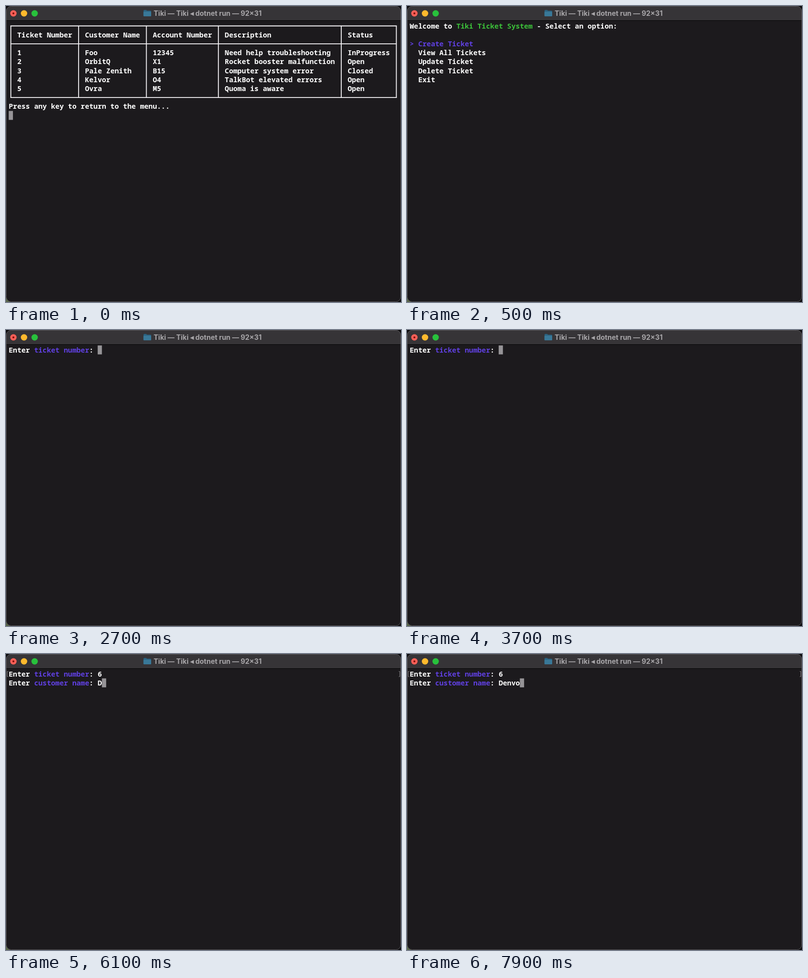
Recreate the animation shown at these times as an HTML page. Size 800 px wide and 602 px high, loop 8 s.

```html
<!DOCTYPE html>
<html lang="en">
<head>
<meta charset="utf-8">
<title>Ticket terminal</title>
<style>
  html, body { margin: 0; width: 100%; height: 100%; overflow: hidden; background: #0c0b0d; }
  svg { display: block; width: 800px; height: 602px; }
  text { white-space: pre; }
  #screen { font: 600 14.3px "Noto Sans Mono", "DejaVu Sans Mono", monospace; }
  #title { font: 700 14px Inter, Roboto, sans-serif; fill: #a8a6a9; }
</style>
</head>
<body>
<svg viewBox="0 0 800 602">
  <path d="M0 592V602H10Z" fill="#59664a"/>
  <rect x=".5" y=".5" width="799" height="601" rx="10" fill="#1c1a1d"/>
  <path d="M.5 29V10.5a10 10 0 0 1 10-10H789.5a10 10 0 0 1 10 10V29Z" fill="#363437"/>
  <path d="M1 29.5H799" stroke="#070608"/>
  <rect x=".5" y=".5" width="799" height="601" rx="10" fill="none" stroke="#5b595c"/>
  <circle cx="15" cy="15" r="6.5" fill="#fe5f57"/>
  <circle cx="15" cy="15" r="2" fill="#7d0d08"/>
  <circle cx="36.5" cy="15" r="6.5" fill="#feb92d"/>
  <circle cx="58" cy="15" r="6.5" fill="#28c13c"/>
  <path d="M278.5 9.5q0-1.5 1.5-1.5h4l1.5 1.5h7q1.5 0 1.5 1.500V19.500q0 1.500-1.500 1.500H280q-1.500 0-1.500-1.500Z" fill="#2b617f"/>
  <rect x="278.500" y="11.500" width="15.500" height="9.500" rx="1.200" fill="#397898"/>
  <text id="title" x="299" y="19.500">Tiki — Tiki ◂ dotnet run — 92×31</text>
  <g id="screen"></g>
</svg>
<script>
const CELL = 8.58, LINE = 18.2, LEFT = 5.5, TOP = 31.4;
const WHITE = "#fff", PURPLE = "#6040e2", GREEN = "#3cc23a", GRAY = "#969497";
const screen = document.getElementById("screen");

const px = col => LEFT + col * CELL;
const py = row => TOP + row * LINE;

const text = (col, row, str, fill = WHITE) =>
  `<text x="${px(col)}" y="${py(row) + 14.2}" fill="${fill}">${str.replace(">", "&gt;")}</text>`;

const cursor = (col, row) =>
  `<rect x="${px(col)}" y="${py(row)}" width="${CELL}" height="${LINE}" fill="${GRAY}"/>`;

function table() {
  const cols = [2, 18, 34, 51, 80];
  const rows = [
    ["Ticket Number", "Customer Name", "Account Number", "Description", "Status"],
    ["1", "Foo", "12345", "Need help troubleshooting", "InProgress"],
    ["2", "OrbitQ", "X1", "Rocket booster malfunction", "Open"],
    ["3", "Pale Zenith", "B15", "Computer system error", "Closed"],
    ["4", "Kelvor", "O4", "TalkBot elevated errors", "Open"],
    ["5", "Ovra", "M5", "Quoma is aware", "Open"]
  ];
  const mid = row => py(row + .5);
  const across = [0, 2, 8].map(r => `M${px(.5) - 1} ${mid(r)}H${px(91.5) + 1}`);
  const down = [.5, 16.5, 32.5, 49.5, 78.5, 91.5].map(c => `M${px(c)} ${mid(0)}V${mid(8)}`);
  return `<path d="${across.join("")}${down.join("")}" stroke="#f4f2f5" stroke-width="1.8"/>` +
    rows.map((r, i) => r.map((s, j) => text(cols[j], i ? i + 2 : 1, s)).join("")).join("") +
    text(0, 9, "Press any key to return to the menu...");
}

function menu() {
  const items = ["View All Tickets", "Update Ticket", "Delete Ticket", "Exit"];
  return text(0, 0, "Welcome to") + text(11, 0, "Tiki Ticket System", GREEN) +
    text(30, 0, "- Select an option:") + text(0, 2, "> Create Ticket", PURPLE) +
    items.map((s, i) => text(2, i + 3, s)).join("");
}

const prompt = (row, label, value) =>
  text(0, row, "Enter") + text(6, row, label, PURPLE) + text(19, row, ": " + value);

const brackets = `<path d="M4.500 35.500H2.500V46H4.500M795.500 35.500H797.500V46H795.500" fill="none" stroke="#858386"/>`;

const NAME = "Denvo", KEYS = [6000, 6500, 7200, 7600, 7900];
const HIDDEN = [[100, 500], [3000, 3600], [5000, 5600]];

function frame(t) {
  const lit = !HIDDEN.some(([a, b]) => t >= a && t < b);
  const caret = (col, row) => lit ? cursor(col, row) : "";
  if (t < 500) return table() + caret(0, 10);
  if (t < 2100) return menu();
  const number = t < 3800 ? "" : "6";
  const first = prompt(0, "ticket number", number);
  if (t < 4200) return first + caret(21 + number.length, 0);
  const typed = KEYS.filter(k => t >= k).length;
  return brackets + first + prompt(1, "customer name", NAME.slice(0, typed)) + caret(21 + typed, 1);
}

let shown = "";
function draw(now) {
  const next = frame(now % 8000);
  if (next !== shown) screen.innerHTML = shown = next;
  requestAnimationFrame(draw);
}
draw(performance.now());
</script>
</body>
</html>
```
